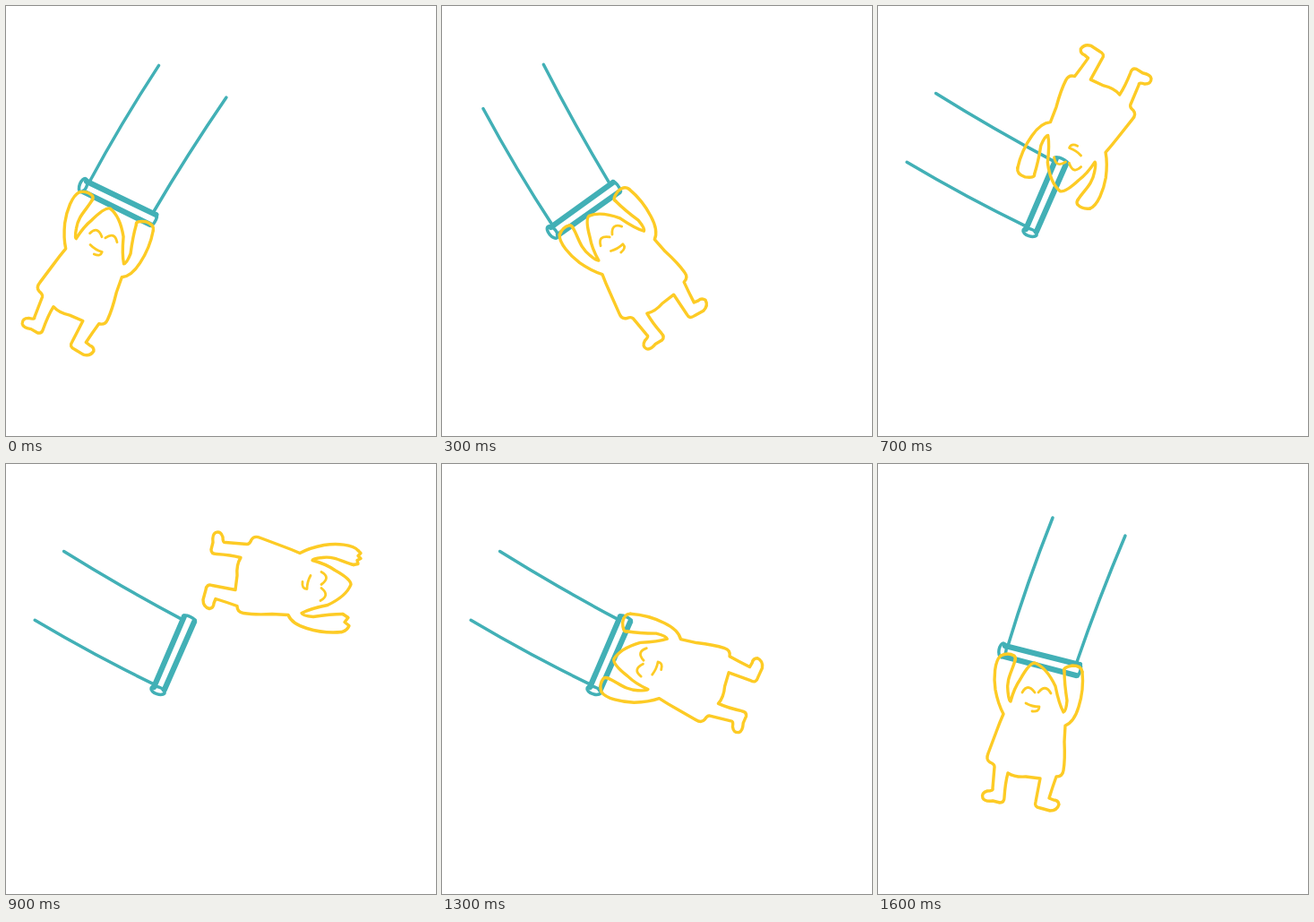
These frames come from a looping animation (480 by 480 pixels, 1.7 s). An HTML page:

```html
<!DOCTYPE html>
<html>
<head>
<meta charset="utf-8">
<style>
  html, body { margin: 0; height: 100%; overflow: hidden; background: #fff; }
  svg { display: block; width: 100vw; height: 100vh; }
  path, ellipse { fill: none; stroke-linecap: round; stroke-linejoin: round; }
  #trapeze { stroke: #42b0b6; stroke-width: 3.5; }
  #trapeze .bar { stroke-width: 6.2; }
  #body { stroke: #fdcb25; stroke-width: 3.4; }
  #body .face { stroke-width: 2.8; }
</style>
</head>
<body>
<svg viewBox="0 0 480 480">
  <g id="trapeze">
    <path d="M195 60Q166 133 145 203M276 80Q246 151 222 221"/>
    <path class="bar" d="M142 203L225 224M141 215L221 236"/>
    <path d="M226 223Q228 229 223 237"/>
    <ellipse cx="139" cy="208" rx="4" ry="8" transform="rotate(10 139 208)"/>
  </g>
  <g id="body">
    <path d="M137 214C130 220 129 238 131 252Q134 268 140 279Q136 288 132 299L123 323Q120 330 125 333Q130 335 130 338
      L128 362Q129 365 122 365Q115 367 117 373Q119 377 128 376L136 378Q141 378 141 372Q142 356 145 345Q153 350 165 349
      L181 351L176 377Q174 383 181 384L192 387Q200 387 202 380Q201 375 196 375L191 373Q195 360 199 349Q206 349 207 342
      Q209 330 208 310L209 292Q219 288 224 271Q230 252 228 232"/>
    <path d="M153 219C150 231 143 240 145 254Q146 265 148 265Q152 250 159 240Q169 222 175 222Q188 227 198 248
      Q202 268 207 277Q210 276 211 264Q208 245 208 231"/>
    <path id="hands"/>
    <path class="face" d="M161 255Q167 244 175 255M179 255Q187 245 193 256M165 267Q172 271 180 271Q180 277 172 276"/>
  </g>
</svg>
<script>
const STEP = 100, LOOP = 1700, RELEASE = 900, CATCH = 1300;
const GRIP = "M137 214Q145 210 152 214Q154 216 153 219M228 232Q227 225 217 225Q206 227 208 231";
const OPEN = "M137 214L140 211L143 214L146 211L148 215L152 214L153 219M228 232Q226 226 221 224L217 229L212 225L208 231";

// Key poses: ms, x, y, degrees. The trapeze turns about its bar, the body about its hands.
const swing = [
  [0, 129, 213, 11.5], [200, 147, 228, -29], [300, 155, 221, -50], [500, 180.5, 209.5, -81],
  [1300, 180.5, 209.5, -81], [1600, 183.5, 212, 0]
];
const acrobat = [
  [0, 123, 228, 16.3], [200, 154, 240, -24], [300, 169, 229.5, -44.5], [500, 196.5, 213, -76.5],
  [600, 211, 205, -87], [800, 182, 204, -237], [900, 385, 141.5, -270], [1000, 382, 85, -325],
  [1100, 252, 116, -404.2], [1300, 193, 211, -440.7], [1600, 182, 222, -360]
];

const $ = id => document.getElementById(id);

function poseAt(keys, ms) {
  const next = Math.max(1, keys.findIndex(key => key[0] >= ms));
  const [from, to] = [keys[next - 1], keys[next]];
  const progress = (ms - from[0]) / (to[0] - from[0]);
  return from.map((value, i) => value + (to[i] - value) * progress);
}

function place(id, [, x, y, angle], pivotX, pivotY) {
  $(id).setAttribute("transform", `translate(${x} ${y}) rotate(${angle}) translate(${-pivotX} ${-pivotY})`);
}

function draw() {
  const ms = Math.floor(performance.now() % LOOP / STEP) * STEP;
  place("trapeze", poseAt(swing, ms), 183.5, 212);
  place("body", poseAt(acrobat, ms), 182, 222);
  $("hands").setAttribute("d", ms >= RELEASE && ms < CATCH ? OPEN : GRIP);
  requestAnimationFrame(draw);
}
draw();
</script>
</body>
</html>
```
